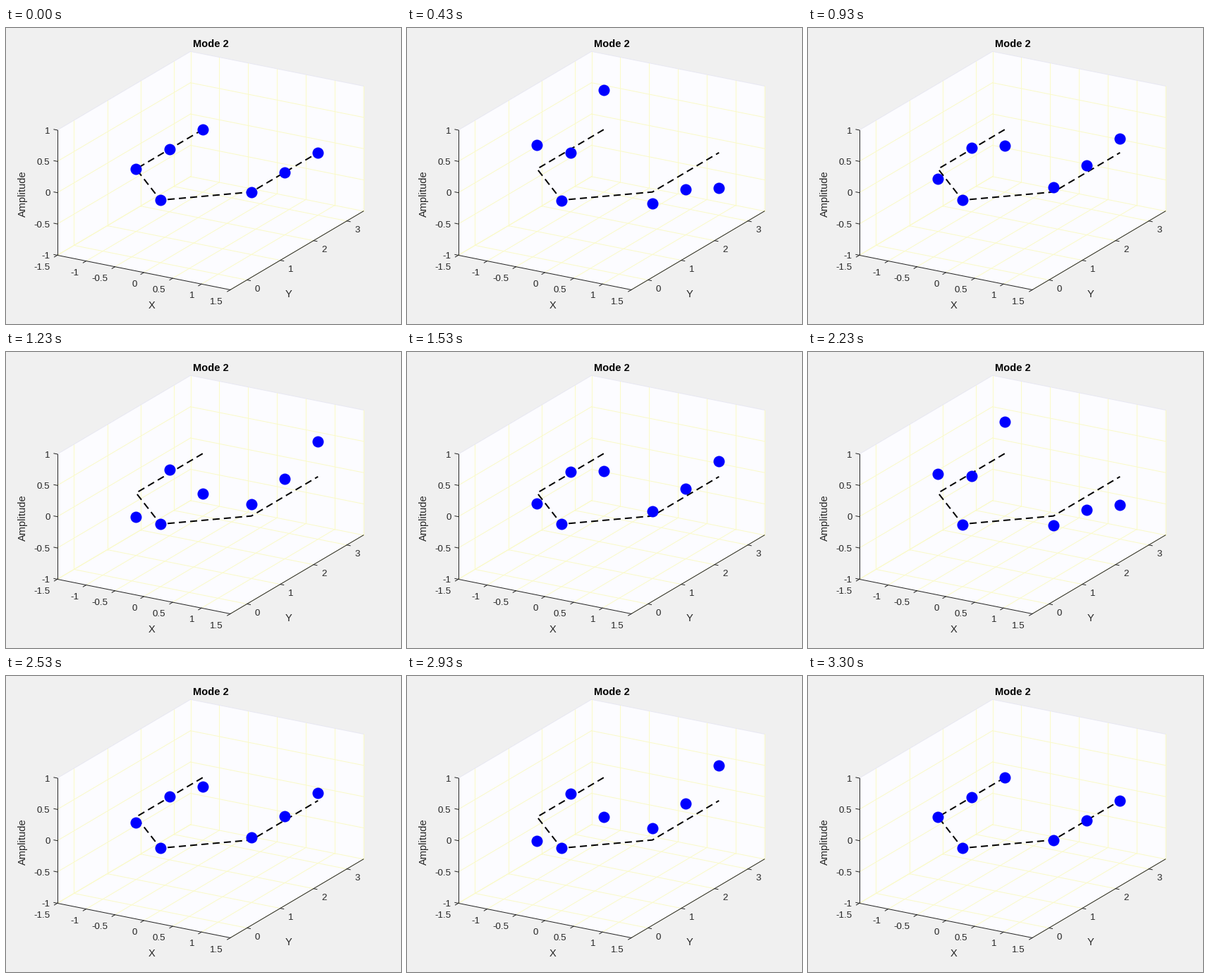
Recreate the animation shown at these times as a matplotlib script. Size 560 by 420 pixels, loop 3.33 s.

```python
import numpy as np
import matplotlib.pyplot as plt
from matplotlib.animation import FuncAnimation

W, H, DPI = 560, 420, 100
LOOP, TICK = 3330, 10       # ms; poses change on 10 ms ticks, 30 per second
POSES, CYCLES = 100, 2
PX = 72 / DPI               # points per pixel

PAPER, WALL, INK = "#f0f0f0", "#fcfcff", "#262626"
GRID, RIM = "#fafac8", "#e8e8f2"

plt.rcParams["font.family"] = "Liberation Sans"

X_MIN, X_MAX = -1.5, 1.5
Y_MIN, Y_MAX = -0.5, 3.5
Z_MIN, Z_MAX = -1, 1
X_TICKS = np.arange(-1.5, 1.6, 0.5)
Y_TICKS = np.arange(4)
Z_TICKS = np.arange(-1, 1.1, 0.5)

# Screen vectors of one unit along each axis
CORNER = np.array([72.8, 322.4])
EX = np.array([81.74, 16.35])
EY = np.array([47.19, -27.9])
EZ = np.array([0.0, -88.75])


def project(x, y, z):
    return CORNER + (x - X_MIN) * EX + (y - Y_MIN) * EY + (z - Z_MIN) * EZ


fig = plt.figure(figsize=(W / DPI, H / DPI), dpi=DPI, facecolor=PAPER)
ax = fig.add_axes([0, 0, 1, 1])
ax.set_xlim(0, W)
ax.set_ylim(H, 0)
ax.axis("off")


def stroke(points, color=INK, width=1, **kw):
    xs, ys = zip(*points)
    ax.plot(xs, ys, color=color, lw=width * PX, **kw)


def segments(corners, color=INK):
    """Separate lines, so that upright ones stay sharp."""
    points = [project(*c) for c in corners]
    for pair in zip(points, points[1:]):
        stroke(pair, color)


def label(x, y, text, size=13.33, ha="center", color=INK, **kw):
    ax.text(x, y, text, fontsize=size * PX, ha=ha, va="baseline",
            color=color, **kw)


def tick(at, direction, length=5):
    stroke([at, at + direction / np.hypot(*direction) * length])


def draw_walls():
    outline = [(X_MIN, Y_MIN, Z_MIN), (X_MAX, Y_MIN, Z_MIN),
               (X_MAX, Y_MAX, Z_MIN), (X_MAX, Y_MAX, Z_MAX),
               (X_MIN, Y_MAX, Z_MAX), (X_MIN, Y_MIN, Z_MAX)]
    xs, ys = zip(*(project(*p) for p in outline))
    ax.fill(xs, ys, color=WALL, lw=0)


def draw_grid():
    # Each grid line bends from one plane to the next at the far edge
    for x in X_TICKS:
        segments([(x, Y_MIN, Z_MIN), (x, Y_MAX, Z_MIN), (x, Y_MAX, Z_MAX)],
                 GRID)
    for y in Y_TICKS:
        segments([(X_MAX, y, Z_MIN), (X_MIN, y, Z_MIN), (X_MIN, y, Z_MAX)],
                 GRID)
    for z in Z_TICKS:
        segments([(X_MIN, Y_MIN, z), (X_MIN, Y_MAX, z), (X_MAX, Y_MAX, z)],
                 RIM if z == Z_MAX else GRID)


def draw_axes():
    segments([(X_MIN, Y_MIN, Z_MAX), (X_MIN, Y_MIN, Z_MIN),
              (X_MAX, Y_MIN, Z_MIN), (X_MAX, Y_MAX, Z_MIN)])
    for x in X_TICKS:
        p = project(x, Y_MIN, Z_MIN)
        tick(p, -EY)
        label(p[0] - 10, p[1] + 20.2, f"{x:g}", ha="right")
    for y in Y_TICKS:
        p = project(X_MAX, y, Z_MIN)
        tick(p, EX)
        label(p[0] + 11, p[1] + 16.5, f"{y:g}", ha="left")
    for z in Z_TICKS:
        p = project(X_MIN, Y_MIN, z)
        tick(p, -EX)
        label(p[0] - 10.3, p[1] + 4.6, f"{z:g}", ha="right")
    label(206.3, 397.5, "X", 14.67)
    label(400.4, 382.5, "Y", 14.67)
    label(28.3, 235, "Amplitude", 14.67, rotation=90, rotation_mode="anchor")
    label(290.5, 27.3, "Mode 2", 14.67, color="black", weight="bold")


draw_walls()
draw_grid()
draw_axes()

# Nodes at rest in the plane z = 0, and their mode shape
NODES = [(-1, 3), (-1, 2), (-1, 1), (0, 0), (1, 1), (1, 2), (1, 3)]
SHAPE = np.array([0.64, -0.056, 0.385, -0.007, -0.188, -0.277, -0.567])

rest = np.array([project(x, y, 0) for x, y in NODES])
stroke(rest, "black", 2, ls=(0, (5, 3)), dash_capstyle="butt", zorder=3)
dots, = ax.plot(rest[:, 0], rest[:, 1], "o", color="#0000ff",
                ms=16 * PX, mew=0, zorder=4)


def update(i):
    pose = (3 * i + 1) // 10
    swing = np.sin(2 * np.pi * CYCLES * pose / (POSES - 1))
    dots.set_data(*(rest + np.outer(SHAPE * swing, EZ)).T)
    return dots,


anim = FuncAnimation(fig, update, frames=LOOP // TICK, interval=TICK,
                     repeat=True, repeat_delay=0)
plt.show()
```
